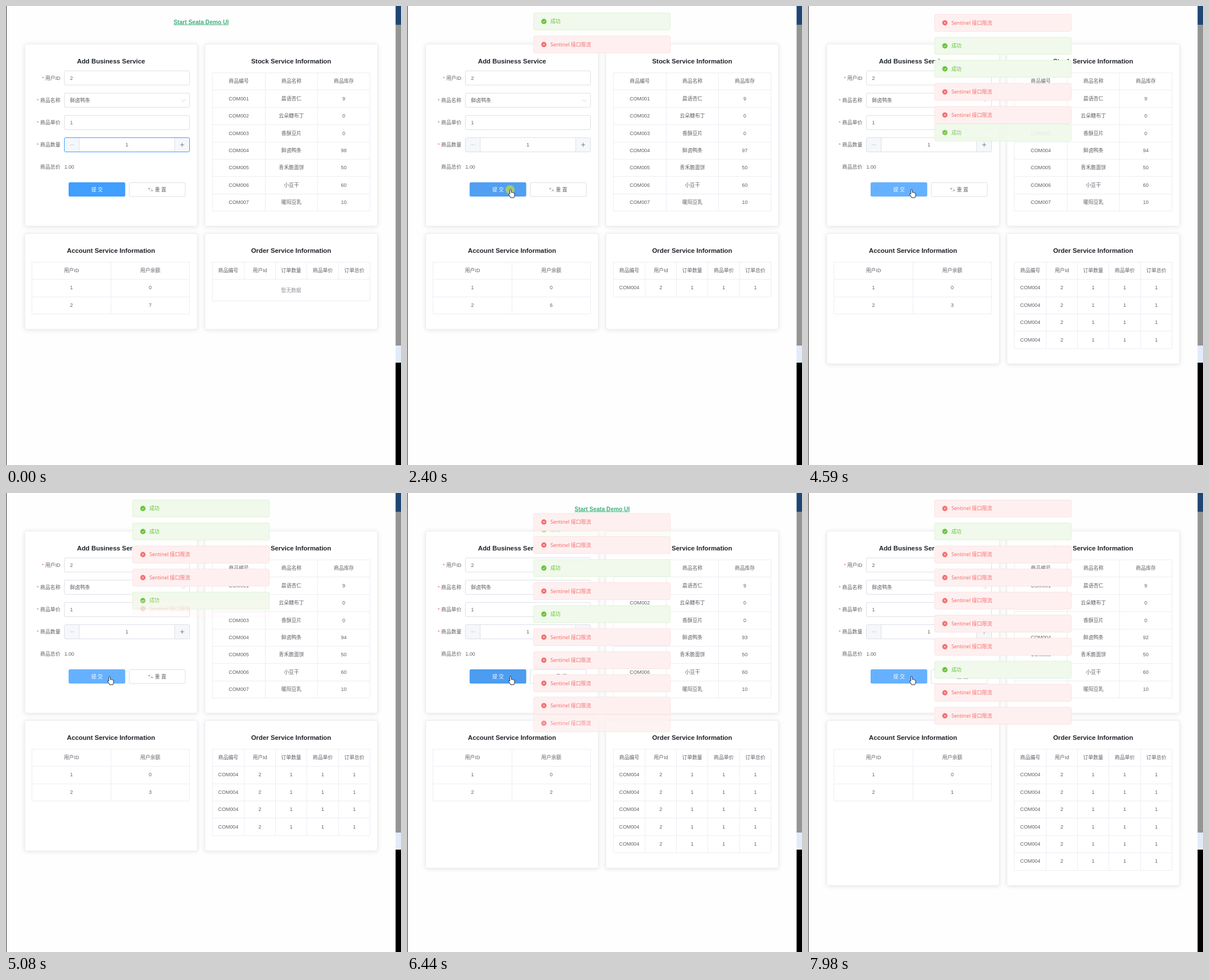
An HTML page with a canvas that plays this animation: 694x807 px, repeating every 8 s.

```html
<!DOCTYPE html>
<html lang="zh">
<head>
<meta charset="utf-8">
<title>Seata Demo UI</title>
<style>
  html, body { margin: 0; width: 100%; height: 100%; overflow: hidden; background: #fefefe; }
  canvas { display: block; }
</style>
</head>
<body>
<canvas id="stage" width="694" height="807"></canvas>
<script>
const ctx = document.getElementById('stage').getContext('2d');
const LOOP = 8000, ROW = 30.4, SLOT = 40.5, LIFE = 3000;
const UI = '"Liberation Sans", "Noto Sans CJK SC", "Noto Sans CJK", sans-serif';
const TOAST = '"Noto Sans", "Noto Sans CJK SC", "Noto Sans CJK", sans-serif';
const INK = '#606266', LINE = '#ebeef5', EDGE = '#dcdfe6', BLUE = '#409eff';

// Times at which a toast appears; each follows a click on the submit button.
const births = [1310, 1660, 2590, 3340, 4135, 4190, 4405, 5030, 5400, 5570,
  5850, 6010, 6140, 6290, 6560, 6740, 6900];
const successes = [0, 2, 3, 6, 8, 14];
const clicks = [840, ...births.map(b => b - 240)];
const PRESS = 90, ARRIVE = 750;

const goods = [['晨语杏仁', 9], ['云朵糖布丁', 0], ['香酥豆片', 0], ['鲜卤鸭条', 98],
  ['青禾脆面饼', 50], ['小豆干', 60], ['暖阳豆乳', 10]];

const clamp = x => Math.max(0, Math.min(1, x));
const mix = (a, b, p) => a.map((v, i) => v + (b[i] - v) * p);

// CSS "ease"
function ease(x) {
  x = clamp(x);
  let lo = 0, hi = 1;
  for (let i = 0; i < 16; i++) {
    const s = (lo + hi) / 2;
    if (.75 * s * (1 - s) + s ** 3 < x) lo = s; else hi = s;
  }
  return .3 * lo * (1 - lo) ** 2 + 3 * lo * lo * (1 - lo) + lo ** 3;
}

function text(str, x, y, { size = 8.87, color = INK, align = 'center', weight = 400, font = UI } = {}) {
  ctx.font = `${weight} ${size}px ${font}`;
  ctx.fillStyle = color;
  ctx.textAlign = align;
  ctx.fillText(str, x, y + size * .36);
}

function box(x, y, w, h, fill, stroke, r = 2.5) {
  ctx.beginPath();
  ctx.roundRect(x, y, w, h, r);
  if (fill) { ctx.fillStyle = fill; ctx.fill(); }
  if (stroke) { ctx.strokeStyle = stroke; ctx.lineWidth = 1; ctx.stroke(); }
}

function path(points, color, width = 1) {
  ctx.beginPath();
  points.forEach(([x, y]) => ctx.lineTo(x, y));
  ctx.strokeStyle = color;
  ctx.lineWidth = width;
  ctx.stroke();
}

function disc(x, y, r, color) {
  ctx.beginPath();
  ctx.arc(x, y, r, 0, 7);
  ctx.fillStyle = color;
  ctx.fill();
}

function card(x, y, h, title) {
  ctx.save();
  ctx.shadowColor = 'rgba(0,0,0,.12)';
  ctx.shadowBlur = 8;
  ctx.shadowOffsetY = 1;
  box(x, y, 303, h, '#fff');
  ctx.restore();
  box(x, y, 303, h, null, LINE);
  text(title, x + 151.5, y + 30, { size: 11.4, color: '#1f2329', weight: 700 });
}

function table(edges, top, rows) {
  const left = edges[0], right = edges[edges.length - 1], bottom = top + rows.length * ROW;
  for (let i = 0; i <= rows.length; i++) {
    const y = Math.round(top + i * ROW) + .5;
    path([[left, y], [right, y]], LINE);
  }
  edges.forEach(x => path([[x, top], [x, bottom]], LINE));
  rows.forEach((row, i) => row.forEach((cell, j) =>
    text(cell, (edges[j] + edges[j + 1]) / 2, top + (i + .5) * ROW)));
}

function label(str, y, required = true) {
  text(str, 95.5, y, { align: 'right' });
  if (required) text('*', 95.5 - ctx.measureText(str).width - 2.5, y, { align: 'right', color: '#f56c6c' });
}

function form(t) {
  ['用户ID', '商品名称', '商品单价', '商品数量'].forEach((name, i) => {
    const y = 126.5 + i * 39.2;
    label(name, y);
    if (i < 3) {
      box(102.5, y - 12.5, 220, 25, '#fff', EDGE);
      text(['2', goods[3][0], '1'][i], 112.5, y, { align: 'left' });
    }
  });
  path([[308, 164.5], [311.5, 168], [315, 164.5]], '#c0c4cc', .8);

  box(102.5, 231.5, 220, 25, '#f5f7fa');
  ctx.fillStyle = '#fff';
  ctx.fillRect(128.5, 231.5, 168, 25);
  path([[128.5, 232], [128.5, 256]], EDGE);
  path([[296.5, 232], [296.5, 256]], EDGE);
  box(102.5, 231.5, 220, 25, null, t < 850 ? BLUE : EDGE);
  text('1', 212.5, 244);
  path([[112.5, 244], [119.5, 244]], '#c0c4cc', .8);
  path([[306, 244], [313, 244]], INK, .8);
  path([[309.5, 240.5], [309.5, 247.5]], INK, .8);

  label('商品总价', 283, false);
  text('1.00', 102.5, 283, { align: 'left' });

  const pressed = Math.max(...clicks.map(c =>
    t < c ? 0 : clamp(t < c + PRESS ? (t - c) / 100 : (c + 2 * PRESS - t) / 100)));
  const hover = mix([64, 158, 255], [102, 177, 255], clamp((t - ARRIVE + 40) / 100));
  box(110, 310, 99.5, 25, `rgb(${mix(hover, [58, 142, 230], pressed)})`);
  text('提 交', 160, 322.5, { color: '#fff', weight: 500 });

  box(216.5, 310.5, 98.5, 24.5, '#fff', EDGE);
  text('重 置', 271.5, 322.5, { weight: 500 });
  for (const a of [0, Math.PI]) {
    ctx.save();
    ctx.translate(254, 322.7);
    ctx.rotate(a);
    ctx.beginPath();
    ctx.arc(0, 0, 3, 3.3, 5.9);
    ctx.stroke();
    path([[-3, -3], [-3, -1], [-1, -1]], INK, .8);
    ctx.restore();
  }
}

function page(t) {
  const sold = successes.filter(i => t > births[i] + 100).length;
  const lowerHeight = Math.max(2, sold) * ROW + 107.5;

  ctx.fillStyle = '#fefefe';
  ctx.fillRect(0, 0, 694, 807);
  text('Start Seata Demo UI', 343, 28.5, { size: 10.13, color: '#42b07e', weight: 700 });
  path([[294.5, 33], [391, 33]], '#42b07e');

  card(33, 67, 320, 'Add Business Service');
  card(349.5, 67, 320, 'Stock Service Information');
  card(33, 400, lowerHeight, 'Account Service Information');
  card(349.5, 400, lowerHeight, 'Order Service Information');
  form(t);

  table([362.5, 455.5, 547.5, 639.5], 117, [['商品编号', '商品名称', '商品库存'],
    ...goods.map(([name, count], i) => ['COM00' + (i + 1), name, i === 3 ? count - sold : count])]);
  table([45.5, 184.5, 322.5], 449.7, [['用户ID', '用户余额'], [1, 0], [2, 7 - sold]]);
  table([362.5, 418.5, 473.5, 528.5, 584.5, 639.5], 449.7,
    [['商品编号', '用户Id', '订单数量', '商品单价', '订单总价'],
      ...Array(sold).fill(['COM004', 2, 1, 1, 1])]);
  if (!sold) {
    path([[362.5, 480], [362.5, 518.5], [639.5, 518.5], [639.5, 480]], LINE);
    text('暂无数据', 501, 499.5, { color: '#909399' });
  }

  [[0, 33, '#1f4673'], [33, 564, '#949494'], [597, 30, '#e2ebfa'], [627, 180, '#000']]
    .forEach(([y, h, color]) => { ctx.fillStyle = color; ctx.fillRect(684.5, y, 10, h); });
  ctx.fillStyle = '#333';
  ctx.fillRect(0, 0, 1, 807);
}

// Stack slot of toast i: every earlier toast that closes pulls it up by one.
function slotAt(i, t) {
  const born = births[i], closes = born + LIFE;
  const earlier = births.slice(0, i).map(b => b + LIFE).filter(c => c > born);
  let from = earlier.length, to = from, start = born;
  const at = x => from + (to - from) * ease((x - start) / 400);
  const retarget = (time, goal) => { from = at(time); to = goal; start = time; };
  earlier.filter(c => c < Math.min(t, closes)).forEach(c => retarget(c, to - 1));
  if (t > closes) retarget(closes, i ? 3 : 0);
  return at(t);
}

function toast(i, t) {
  const age = t - births[i], left = age - LIFE;
  if (age < 0 || left > 400) return;
  const good = successes.includes(i);
  const color = good ? '#67c23a' : '#f56c6c';
  const raise = left > 0 ? ease(left / 400) : 1 - ease(age / 400);
  const y = 12.2 + slotAt(i, t) * SLOT - raise * ROW, mid = y + 15;

  ctx.globalAlpha = left > 0 ? 1 - ease(left / 300) : ease(age / 300);
  box(222.5, y, 240, 30, good ? '#f0f9eb' : '#fef0f0', good ? '#e1f3d8' : '#fde2e2');
  disc(240.5, mid, 4.6, color);
  if (good) {
    path([[238.3, mid], [240, mid + 1.7], [242.8, mid - 1.4]], '#fff', .9);
  } else {
    path([[239, mid - 1.5], [242, mid + 1.5]], '#fff', .9);
    path([[242, mid - 1.5], [239, mid + 1.5]], '#fff', .9);
  }
  text(good ? '成功' : 'Sentinel 接口限流', 252, mid, { align: 'left', color, font: TOAST });
  ctx.globalAlpha = 1;
}

const ARROW = new Path2D('M0 0V15L3.5 11.8 6 17.5 8.2 16.5 5.8 11H10.5Z');
const HAND = new Path2D('M-.8 1.2Q.6 -.6 1.8 1.2V6Q3 5 4 6.2 5.2 5.4 6 6.8 7.6 6.4 7.6 8V11.5Q7 13 6.4 15H.4Q-.6 12-3 9.6-3.6 7.4-.8 8.6Z');

function pointer(t) {
  if (t < 70) return;
  const p = clamp((t - 70) / (ARRIVE - 70)), s = p * p * (3 - 2 * p);
  const [x, y] = mix([506, 689], [181.5, 322], s);
  if (clicks.some(c => t >= c && t < c + PRESS)) disc(181, 323, 8, 'rgba(190,215,70,.75)');
  ctx.save();
  ctx.translate(x, y);
  const shape = y < 335 ? HAND : ARROW;
  ctx.fillStyle = '#fff';
  ctx.fill(shape);
  ctx.strokeStyle = '#1c2b3c';
  ctx.lineWidth = 1;
  ctx.stroke(shape);
  ctx.restore();
}

function draw() {
  const t = performance.now() % LOOP;
  page(t);
  births.forEach((_, i) => toast(i, t));
  pointer(t);
  requestAnimationFrame(draw);
}
draw();
</script>
</body>
</html>
```
